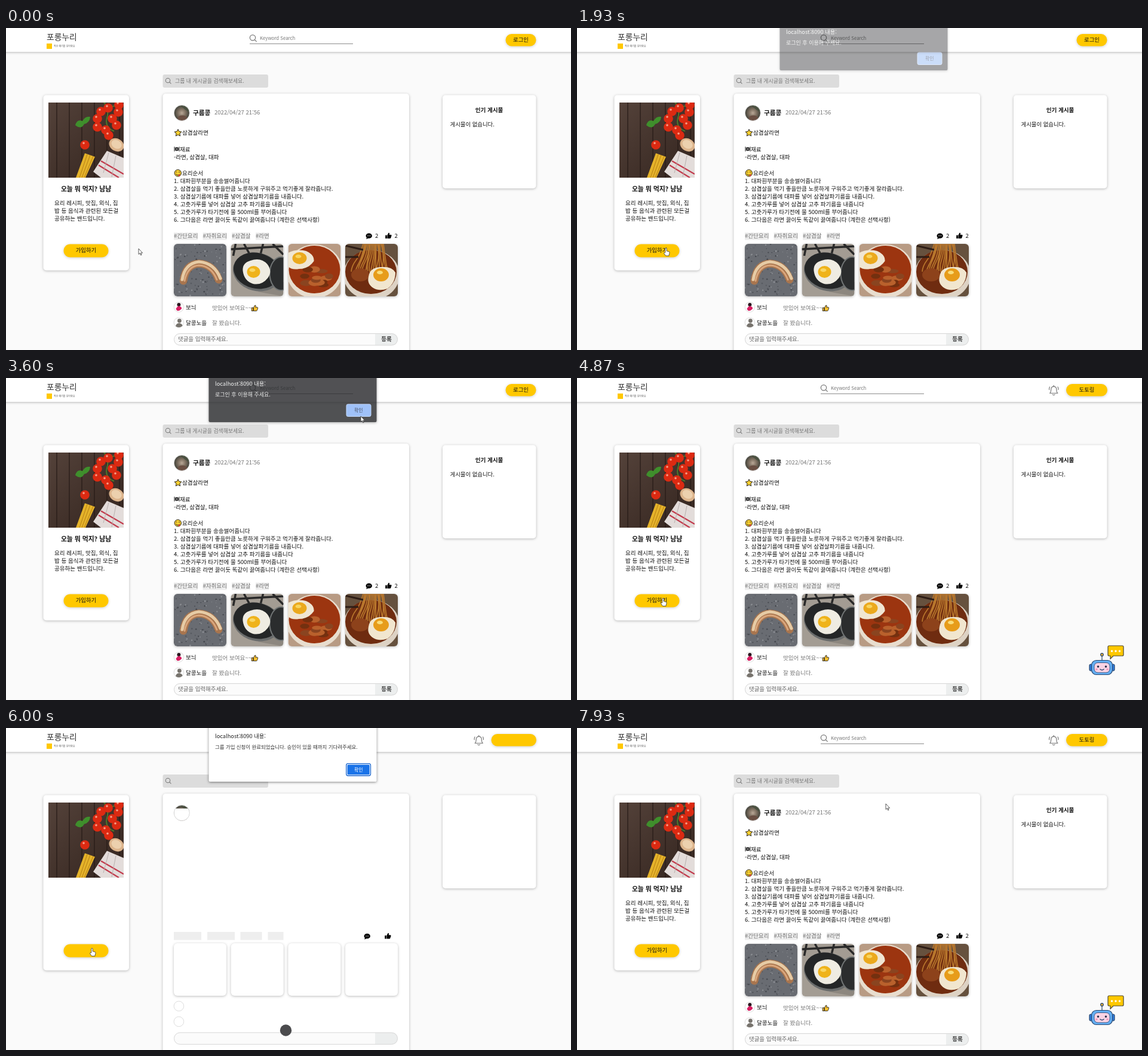
Write an HTML page that moves like this. It is 946 by 540 pixels and loops after 8 s.

```html
<!DOCTYPE html>
<html lang="ko">
<head>
<meta charset="utf-8">
<title>Group page</title>
<style>
html, body { margin: 0; width: 100%; height: 100%; overflow: hidden; background: #fafafa; }
svg { display: block; width: 946px; height: 540px; }
text { font: 9.55px "Noto Sans CJK KR", "Noto Sans KR", "Noto Sans CJK JP", "Noto Sans", sans-serif; fill: #111; white-space: pre; }
.mid { text-anchor: middle; }
.b { font-weight: 700; }
.gray { fill: #777; }
.card { fill: #fff; filter: drop-shadow(0 1px 2px #0004); }
.btn { fill: #ffc800; filter: drop-shadow(0 1px 2px #0003); }
.ring { fill: #fff; stroke: #d4d4d4; stroke-width: .8; }
.icon { fill: none; stroke: #777; stroke-width: 1.2; stroke-linecap: round; }
.blank .txt, .blank .member, .guest .member, .guest .session, .nopic .pic,
svg:not(.guest) .visitor, svg:not(.blank) .load { display: none; }
.blank #photos { transform: translateY(-1px); }
.blank #replies { transform: translateY(-1.6px); }
.blank #bell { transform: translateX(-6.5px); }
</style>
</head>
<body>
<svg id="stage" class="guest" viewBox="0 0 946 540">
<defs>
  <clipPath id="tile"><rect width="88" height="88" rx="6"/></clipPath>
  <clipPath id="face"><circle r="13"/></clipPath>
  <clipPath id="mini"><circle r="8"/></clipPath>
  <linearGradient id="wood" x2="1" y2="1"><stop stop-color="#54423a"/><stop offset="1" stop-color="#33241e"/></linearGradient>
  <radialGradient id="fur"><stop stop-color="#b9a796"/><stop offset=".5" stop-color="#7d6f60"/><stop offset="1" stop-color="#3f4038"/></radialGradient>
  <g id="thumb"><path d="M0 4.5H2.6V10H0ZM3.2 4.6 5.3.6Q7.2 0 6.9 2L6.5 3.8H9.6Q10.8 4.2 10.3 5.6L9 9.2Q8.7 10 7.8 10H3.2Z"/></g>
  <g id="lens"><circle r="4.4"/><path d="M3.2 3.2 6 6"/></g>
</defs>

<rect width="946" height="540" fill="#fafafa"/>
<rect class="card" x="-5" y="-5" width="956" height="45"/>

<!-- header -->
<text x="68" y="19.5" style="font-size:13.8px;fill:#333">포롱누리</text>
<rect x="68" y="26" width="9" height="9" fill="#ffc800"/>
<text x="80" y="32" style="font-size:4px;fill:#555">작은 얘기를 모아봐요</text>
<g class="txt">
  <use href="#lens" class="icon" transform="translate(413 16.3) scale(1.05)"/>
  <text class="gray" x="425" y="20" style="font-size:7.8px">Keyword Search</text>
  <path d="M408 26.5H581" stroke="#8c8c8c"/>
</g>
<g class="visitor"><rect class="btn" x="836.5" y="10" width="51" height="20.5" rx="10"/><text class="mid" x="862" y="23.3" style="font-size:9.4px">로그인</text></g>
<g class="member"><rect class="btn" x="819" y="10" width="69" height="20.5" rx="10"/><text class="mid" x="853.5" y="23.3" style="font-size:9.4px">도토링</text></g>
<rect class="btn load" x="812.5" y="10" width="75.500" height="20.500" rx="10"/>
<g id="bell" class="session"><path class="icon" d="M792 25.500H804.500Q802.800 23.500 802.800 19.500Q802.800 14.500 798.200 14.200Q793.700 14.500 793.700 19.500Q793.700 23.500 792 25.500ZM798.200 14V12.300M796.200 27.600Q798.200 29.500 800.200 27.600M791.500 15Q790.300 17 790.600 19.500M805 15Q806.200 17 805.900 19.500"/></g>

<!-- left card -->
<rect class="card" x="62.500" y="112.500" width="143.500" height="294" rx="5"/>
<svg x="71" y="125" width="126" height="126" viewBox="0 0 126 126">
  <rect width="126" height="126" fill="url(#wood)"/>
  <path id="planks" fill="none" stroke="#251a16" stroke-width="1.200"/>
  <path d="M93 0Q102 10 98 26T110 48M104 7 120 4" fill="none" stroke="#4d7a2b" stroke-width="2"/>
  <g id="tomatoes" fill="#dc2a12"></g>
  <path d="M45 38Q48 27 57 31Q62 22 70 24Q69 34 60 36Q55 46 45 38Z" fill="#3f8f2c"/>
  <path d="M61 85 78 91 62 126H46Z" fill="#e5b32a"/>
  <path d="M65 87 52 126M70 88 56 126M75 90 60 126" stroke="#b67e14"/>
  <path d="M75 116 98 81 126 93V126H88Z" fill="#e3dcda"/>
  <path d="M84 105 118 126M88 98 126 120" stroke="#c23a4c" stroke-width="2.200"/>
  <path d="M101 84 92 118M113 89 106 125" stroke="#b8afae"/>
  <ellipse cx="114" cy="71" rx="13" ry="10.500" transform="rotate(30 114 71)" fill="#dcb48c"/>
  <ellipse cx="114" cy="70" rx="9" ry="7" transform="rotate(30 114 70)" fill="#ecd0ae"/>
</svg>
<rect class="btn" x="96.500" y="362.500" width="75" height="22" rx="11"/>
<g class="txt">
  <text class="mid b" x="134" y="274" style="font-size:10.800px">오늘 뭐 먹지? 냠냠</text>
  <text x="81" y="297.300">요리 레시피, 맛집, 외식, 집</text>
  <text x="81" y="310.300">밥 등 음식과 관련된 모든걸</text>
  <text x="81" y="323.300">공유하는 밴드입니다.</text>
  <text class="mid" x="134" y="376" style="font-size:9.400px">가입하기</text>
</g>

<!-- right card -->
<rect class="card" x="731" y="112.500" width="156.500" height="156.500" rx="5"/>
<g class="txt">
  <text class="mid b" x="809" y="141">인기 게시물</text>
  <text x="743.500" y="164.800" style="font-size:9.400px">게시물이 없습니다.</text>
</g>

<!-- group search -->
<rect x="262.500" y="78" width="176.500" height="22" rx="3" fill="#dcdcdc"/>
<use href="#lens" class="icon" transform="translate(271 88) scale(.85)"/>
<text class="txt gray" x="283" y="92" style="font-size:8.850px">그룹 내 게시글을 검색해보세요.</text>

<!-- post -->
<rect class="card" x="262.500" y="110" width="412.500" height="450" rx="5"/>
<g transform="translate(294.300 142.500)">
  <g clip-path="url(#face)">
    <circle r="13" fill="url(#fur)"/>
    <path d="M-13-5Q-6-16 3-8T13-3V-13H-13Z" fill="#4a5040"/>
    <ellipse cx="1" cy="9" rx="8" ry="5" fill="#6a4f43"/>
    <rect class="load" x="-13" y="-7.500" width="26" height="21" fill="#fff"/>
  </g>
  <circle r="13" fill="none" stroke="#d4d4d4" stroke-width=".8"/>
</g>
<g class="txt">
  <text class="b" x="313" y="146" style="font-size:10.600px">구름콩</text>
  <text class="gray" x="349" y="145.300">2022/04/27 21:56</text>
  <path d="M288 169.800 289.800 173.600 294 174.100 290.900 177 291.700 181.100 288 179.100 284.300 181.100 285.100 177 282 174.100 286.200 173.600Z" fill="#fbd02f" stroke="#222"/>
  <text x="295" y="179">삼겹살라면</text>
  <circle cx="286" cy="203" r="3.300" fill="#333"/><circle cx="286" cy="203" r="1.500" fill="#888"/>
  <path d="M282 199V207M290 199V207" stroke="#333" stroke-width="1.100"/>
  <text x="291" y="206.500">재료</text>
  <text x="281" y="219.500">-라면, 삼겹살, 대파</text>
  <circle cx="287.800" cy="243.300" r="5.700" fill="#fbd02f" stroke="#222"/>
  <path d="M284.300 242Q285.500 240.300 286.500 242M289 242Q290 240.300 291.300 242M284 244.500Q287.800 249 291.500 244.500" fill="none" stroke="#222"/>
  <ellipse cx="290" cy="247" rx="1.500" ry="1.800" fill="#e2453c"/>
  <text x="295" y="247">요리순서</text>
  <g id="recipe"></g>
  <text x="618" y="352.300">2</text><text x="650.500" y="352.300">2</text>
</g>
<g id="tags"></g>
<g id="counts">
  <g id="bubble"><ellipse cx="607.700" cy="348.500" rx="5.200" ry="4.300"/><path d="M604 351 603.200 354 607 352.500Z"/><path d="M605 348.500H610.500" stroke="#fff" stroke-width="1.200" stroke-dasharray="1.200 1"/></g>
  <use id="like" href="#thumb" x="635.200" y="343"/>
</g>

<g id="photos">
  <g id="frames"></g>
  <g class="pic">
    <g transform="translate(281 362)" clip-path="url(#tile)">
      <rect width="88" height="88" fill="#696c72"/><g id="granite"></g>
      <g fill="none" stroke-linecap="round">
        <path d="M16 62Q20 34 42 33Q66 34 75 60" stroke="#a8754e" stroke-width="13"/>
        <path d="M14 60Q18 33 42 30Q68 32 78 58" stroke="#e6cba5" stroke-width="5"/>
        <path d="M18 62Q23 37 42 36Q63 37 72 60" stroke="#d9a67c" stroke-width="3"/>
      </g>
    </g>
    <g transform="translate(376.500 362)" clip-path="url(#tile)">
      <rect width="88" height="88" fill="#a39c93"/>
      <path d="M0 9 88 4M22 0 34 22M54 0 50 16M8 0 4 20M70 0 88 18" stroke="#292929" stroke-width="3.500"/>
      <path d="M44 80 88 88V64Z" fill="#8d877f"/>
      <ellipse cx="44" cy="47" rx="41" ry="32" transform="rotate(14 44 47)" fill="#6a6c6c"/>
      <ellipse cx="43" cy="45" rx="39" ry="30" transform="rotate(14 43 45)" fill="#242627"/>
      <ellipse cx="84" cy="50" rx="19" ry="28" fill="#2b2d2e" stroke="#717575" stroke-width="2"/>
      <path d="M20 45Q19 32 33 28Q50 22 61 34Q70 46 62 57Q52 70 37 67Q22 62 20 45Z" fill="#efece2"/>
      <ellipse cx="38" cy="47" rx="11" ry="10" fill="#efb31b"/><ellipse cx="36" cy="44" rx="5" ry="3" fill="#f9d765"/>
    </g>
    <g transform="translate(472.500 362)" clip-path="url(#tile)">
      <rect width="88" height="88" fill="#b89b84"/>
      <ellipse cx="44" cy="46" rx="47" ry="45" fill="#e8ddce"/>
      <ellipse cx="44" cy="43" rx="43" ry="40" fill="#9c3510"/>
      <g id="meat"></g>
      <path d="M0 15Q14 8 30 12Q44 18 43 29Q34 42 18 42Q6 44 0 38Z" fill="#f0e6d2"/>
      <ellipse cx="19" cy="24" rx="12" ry="10" fill="#eba91d"/><ellipse cx="17" cy="21" rx="5" ry="3" fill="#f8d55e"/>
    </g>
    <g transform="translate(568 362)" clip-path="url(#tile)">
      <rect width="88" height="88" fill="#66513e"/>
      <ellipse cx="44" cy="52" rx="47" ry="42" fill="#ddd2c4"/>
      <ellipse cx="43" cy="47" rx="43" ry="37" fill="#6f2c10"/>
      <path id="noodles" fill="none" stroke="#b9772c" stroke-width="1.700"/>
      <path d="M0 3 30 10M0 22 22 22" stroke="#2e1d15" stroke-width="3"/>
      <ellipse cx="25" cy="52" rx="15" ry="11" fill="#8d421b"/>
      <path d="M39 55Q41 40 58 39Q78 37 84 48Q84 65 71 75Q57 80 47 74Q36 67 39 55Z" fill="#f1e6cf"/>
      <ellipse cx="60" cy="52" rx="13" ry="11" fill="#e79c1a"/><ellipse cx="58" cy="48" rx="5" ry="3" fill="#f9dc78"/>
    </g>
  </g>
</g>

<g id="replies">
  <circle class="ring" cx="289.400" cy="468" r="8.300"/><circle class="ring" cx="289.400" cy="494" r="8.300"/>
  <g class="pic">
    <g transform="translate(289.400 468)" clip-path="url(#mini)"><circle cy="-4" r="3" fill="#2a1720"/><path d="M-5 3Q0-6 5 2Q2 7-3 6Z" fill="#d81e62"/></g>
    <g transform="translate(289.400 494)" clip-path="url(#mini)" fill="#77736d"><circle cx="1" cy="-3" r="3.400"/><path d="M-6 9Q-5 0 1 1T7 9Z"/></g>
  </g>
  <g class="txt">
    <text x="301" y="471.500">보늬</text><text class="gray" x="345" y="472.500">맛있어 보여요~~</text>
    <use href="#thumb" x="411.300" y="464.500" fill="#fbc02d" stroke="#222" stroke-width=".9"/>
    <text x="301" y="497.500">달콩노을</text><text class="gray" x="345" y="497.500">잘 봤습니다.</text>
  </g>
  <rect x="281.500" y="512.500" width="374" height="19.500" rx="9.700" fill="#fbfbfb"/>
  <path d="M618 512.500H646Q655.500 512.500 655.500 522.200T646 532H618Z" fill="#eceeee"/>
  <rect x="281.500" y="512.500" width="374" height="19.500" rx="9.700" fill="none" stroke="#d6d6d6"/>
  <g class="txt"><text x="288" y="525.300" style="font-size:9.450px;fill:#666">댓글을 입력해주세요.</text><text class="mid b" x="637" y="525.300" style="fill:#333">등록</text></g>
</g>
<circle class="load" cx="468.500" cy="507" r="9.700" fill="#4b4b4d"/>

<g id="robot" stroke="#27466f" stroke-width="1.200">
  <path d="M879 474V466"/><circle cx="879" cy="464" r="2.300" fill="#f2b632"/>
  <rect x="858" y="480" width="6" height="11" rx="2.500" fill="#2f7de0"/><rect x="894" y="480" width="6" height="11" rx="2.500" fill="#2f7de0"/>
  <rect x="861.500" y="473.500" width="35" height="24" rx="8" fill="#64aef2"/>
  <rect x="866" y="477.500" width="26" height="16.500" rx="6" fill="#fbd3e4" stroke-width=".8"/>
  <path d="M875.500 488Q879 491.500 882.500 488" fill="none"/>
  <g stroke="none"><circle cx="872.500" cy="484" r="1.800" fill="#27304a"/><circle cx="885.500" cy="484" r="1.800" fill="#27304a"/><circle cx="870" cy="488.500" r="1.600" fill="#f58fb4"/><circle cx="888" cy="488.500" r="1.600" fill="#f58fb4"/></g>
  <path d="M891 449H913Q915 449 915 451V464Q915 466 913 466H898L893 471V466H891Q889 466 889 464V451Q889 449 891 449Z" fill="#ffc800" stroke="#4b4632"/>
  <g fill="#fff" stroke="none"><circle cx="895.500" cy="458" r="1.700"/><circle cx="902" cy="458" r="1.700"/><circle cx="908.500" cy="458" r="1.700"/></g>
</g>

<!-- dialogs -->
<g id="dark">
  <rect x="339.500" y="-20" width="281" height="100" rx="2" fill="#292a2d" style="filter:drop-shadow(0 1px 2px #0006)"/>
  <text x="350" y="18.600" style="font-size:9.250px;fill:#f1f1f1">localhost:8090 내용:</text>
  <text x="350" y="37" style="font-size:9px;fill:#e4e4e4">로그인 후 이용해 주세요.</text>
  <rect x="570" y="50" width="41" height="20.500" rx="2.500" fill="#8ab4f8" stroke="#b9d3fb"/>
  <text class="mid" x="590.300" y="63.200" style="font-size:8px;fill:#26314a">확인</text>
</g>
<g id="light">
  <rect x="339.500" y="-20" width="281" height="112" rx="2" fill="#fff" style="filter:drop-shadow(0 1px 2px #0007)"/>
  <text x="350" y="18.600" style="font-size:9.250px;fill:#222">localhost:8090 내용:</text>
  <text x="350" y="36.700" style="font-size:8.450px;fill:#333">그룹 가입 신청이 완료되었습니다. 승인이 있을 때까지 기다려주세요.</text>
  <rect x="569.700" y="61.700" width="40.800" height="20.300" rx="3" fill="#fff" stroke="#1a66cf" stroke-width="1.300"/>
  <rect id="ok" x="571.500" y="63.500" width="37.200" height="16.700" rx="1.500" fill="#1a73e8"/>
  <text class="mid" x="590.300" y="74.800" style="font-size:8px;fill:#fff">확인</text>
</g>

<g id="cursor" fill="#fff" stroke="#333" stroke-width=".8" stroke-linejoin="round">
  <path id="arrow" d="M0 0V9.500L2.200 7.600 3.700 11 5.100 10.400 3.700 7.200H6.600Z"/>
  <path id="hand" d="M-1.200 7.500V1a1.200 1.200 0 0 1 2.400 0V5L5 6Q6.400 6.500 6 8.500L5 11.500V13H-.5L-3.300 9Q-3.700 7.300-2.300 7.300Z"/>
</g>
</svg>

<script>
const $ = id => document.getElementById(id);
let seed = 7;
const rnd = n => (seed = seed * 16807 % 2147483647) / 2147483647 * n;
const range = (n, f) => Array.from({ length: n }, (_, i) => f(i)).join('');

// static content
$('recipe').innerHTML = [
  '대파흰부분을 송송썰어줍니다',
  '삼겹살을 먹기 좋을만큼 노릇하게 구워주고 먹기좋게 잘라줍니다.',
  '삼겹살기름에 대파를 넣어 삼겹살파기름을 내줍니다.',
  '고춧가루를 넣어 삼겹살 고추 파기름을 내줍니다',
  '고춧가루가 타기전에 물 500ml를 부어줍니다',
  '그다음은 라면 끓이듯 똑같이 끓여줍니다 (계란은 선택사항)'
].map((s, i) => `<text x="281" y="${259.6 + 13.05 * i}">${i + 1}. ${s}</text>`).join('');

$('tags').innerHTML = [
  ['간단요리', 281, 40, 281, 46], ['자취요리', 329.5, 40, 337, 46],
  ['삼겹살', 378, 31, 392.5, 36], ['라면', 418, 22, 438.5, 26]
].map(([s, x, w, bx, bw]) =>
  `<g class="txt"><rect x="${x}" y="343" width="${w}" height="12.5" fill="#ededed"/><text class="gray" x="${x}" y="352.3">#${s}</text></g>
   <rect class="load" x="${bx}" y="342" width="${bw}" height="13.500" fill="#eee"/>`).join('');

$('frames').innerHTML = range(4, i => `<rect class="card" x="${281 + 95.7 * i}" y="362" width="88" height="88" rx="6"/>`);
$('planks').setAttribute('d', range(6, i => `M${14 + 21 * i} 0V126`));
$('tomatoes').innerHTML = [[88, 15], [100, 9], [117, 16], [118, 4], [82, 27], [107, 27], [82, 41], [96, 46], [114, 38], [101, 55], [61, 71]]
  .map(([x, y]) => `<circle cx="${x}" cy="${y}" r="7.800"/><circle cx="${x - 2}" cy="${y - 3}" r="1.800" fill="#f9a08a"/>`).join('');
$('granite').innerHTML = range(150, i =>
  `<circle cx="${rnd(88)}" cy="${rnd(88)}" r="${.5 + rnd(1)}" fill="${['#46494f', '#8b8e93', '#575a60'][i % 3]}"/>`);
$('meat').innerHTML = range(14, i =>
  `<ellipse cx="${16 + rnd(56)}" cy="${34 + rnd(36)}" rx="${5 + rnd(6)}" ry="${3 + rnd(3)}" fill="${['#8a4420', '#b9612c', '#74300f'][i % 3]}"/>`);
$('noodles').setAttribute('d', range(18, i =>
  `M${30 + i * 2} 0Q${24 + i * 2.4 + rnd(6)} 18 ${18 + i * 3} ${26 + rnd(12)}T${10 + i * 4} ${44 + rnd(8)}`));

// timeline: 120 steps of 1/15 s
const pointer = [
  [0, 222, 370], [18, 222, 370], [22, 174, 371], [26, 143, 370], [28, 149, 369], [36, 149, 369],
  [40, 390, 205], [44, 611, 73], [46, 611, 73], [50, 594, 64], [58, 594, 64],
  [59, 237, 382], [66, 237, 382], [68, 165, 374], [70, 86, 368], [73, 144, 369.500],
  [79, 144, 369.500], [81, 140, 365], [83, 144, 369.500], [91, 144, 369.500], [98, 536, 114],
  [99, 536, 114], [104, 595, 69], [115, 595, 69], [119, 517, 127]
];
const darkKeys = [[27, -12, 0], [28, -11, .15], [29, -9, .41], [30, -5, .85], [31, 0, 1], [53, 0, 1], [54, -6, .81], [55, -9, .41], [56, -12, 0]];
const lightKeys = [[86, -12, 0], [88, -8, .5], [90, -2, 1], [91, 0, 1], [106, 0, 1], [107, -6, .81], [108, -9, .41], [109, -12, 0]];

function at(keys, s) {
  const j = keys.findIndex(k => k[0] > s);
  if (j === 0) return keys[0].slice(1);
  if (j < 0) return keys[keys.length - 1].slice(1);
  const [a, b] = [keys[j - 1], keys[j]], f = (s - a[0]) / (b[0] - a[0]);
  return [1, 2].map(i => a[i] + (b[i] - a[i]) * f);
}
const show = (id, on) => { $(id).style.display = on ? '' : 'none'; };
const move = (id, x, y) => $(id).setAttribute('transform', `translate(${x} ${y})`);

function dialog(id, keys, s) {
  const [y, alpha] = at(keys, s);
  show(id, alpha > 0);
  move(id, 0, y);
  $(id).setAttribute('opacity', alpha);
}

function draw(s) {
  const blank = s >= 86 && s < 111;
  $('stage').setAttribute('class', (s < 59 ? 'guest' : blank ? 'blank' : 'user') + (s >= 86 && s < 93 ? ' nopic' : ''));
  show('robot', s >= 59 && s < 86 || s >= 113);
  move('bubble', blank ? -3 : 0, blank ? .5 : 0);
  move('like', blank ? -1 : 0, blank ? .5 : 0);
  dialog('dark', darkKeys, s);
  dialog('light', lightKeys, s);
  const [x, y] = at(pointer, s);
  const over = x > 96 && x < 172 && y > 362 && y < 385;
  move('cursor', x, y);
  show('hand', over);
  show('arrow', !over);
  $('ok').setAttribute('fill', s >= 102 ? '#347fe8' : '#1a73e8');
}

const start = performance.now();
function tick() {
  const t = (performance.now() - start) % 8000;
  draw(Math.floor((t + 4) * .015) % 120);
  requestAnimationFrame(tick);
}
tick();
</script>
</body>
</html>
```
